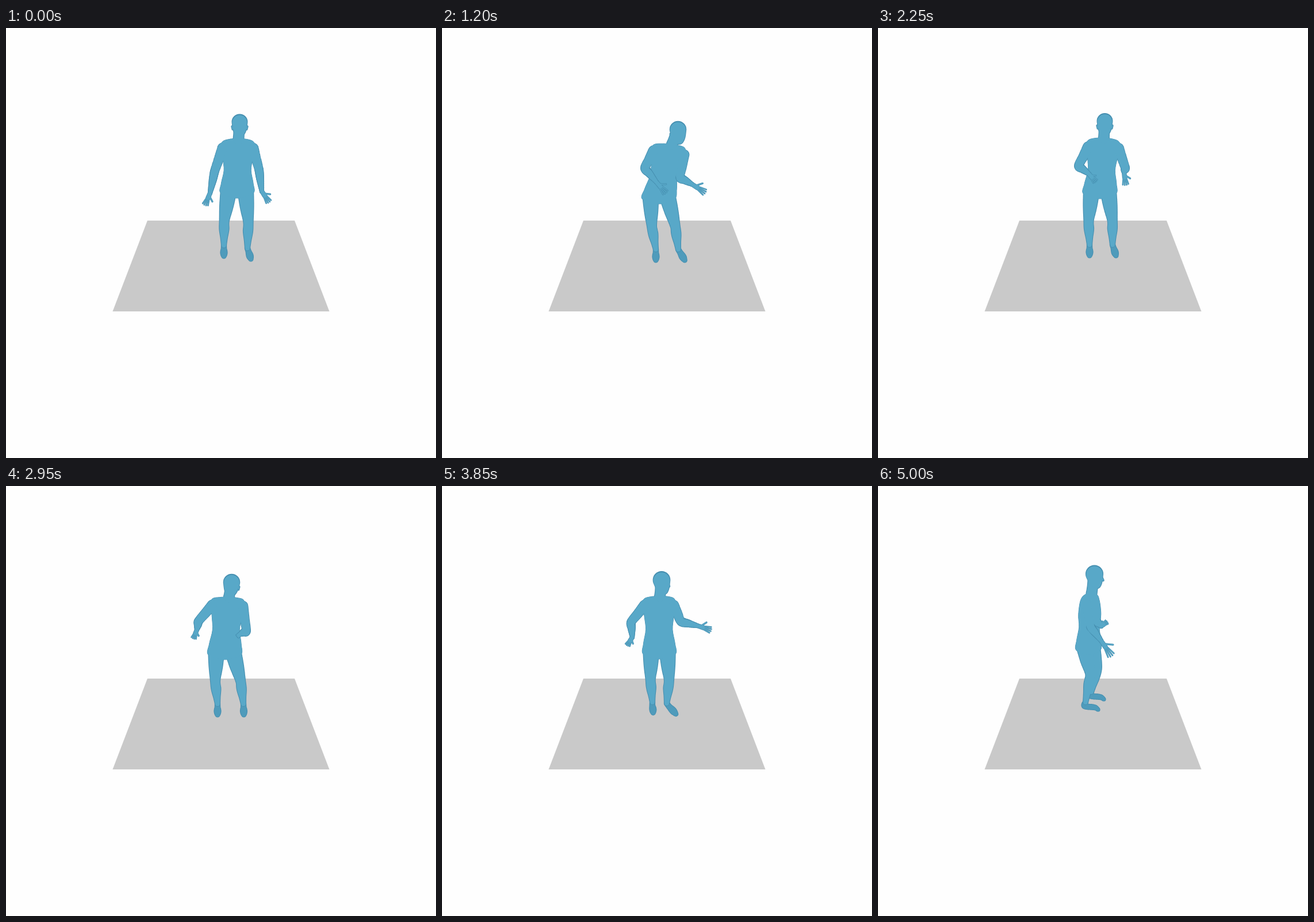
Animation, 748 px wide and 748 px high, one loop 5.05 s. Source, as an HTML page with a canvas:

```html
<!DOCTYPE html>
<html lang="en">
<head>
<meta charset="utf-8">
<title>Gesturing figure</title>
<style>
  html, body { margin: 0; width: 100%; height: 100%; overflow: hidden; background: #fefefe; }
  canvas { display: block; width: 748px; height: 748px; }
</style>
</head>
<body>
<canvas id="stage" width="748" height="748"></canvas>
<script>
const ctx = document.getElementById('stage').getContext('2d');
const LOOP = 5050, STEP = 50;
const LIGHT = '#58a8c8', RIM = '#468fb0', FOOT = '#4f9bbb';

// Key poses: only the joints that move freely; arms are elbow, wrist, fingertip.
const stand = {
  head: [406.5, 163.5], chest: [403.5, 208], pelvis: [402, 283], yaw: [0],
  armL: [363, 249, 355, 287, 346, 309], armR: [440, 246, 445, 284, 458, 304],
  footL: [379, 378], footR: [420, 383]
};
const lean = {
  head: [399.5, 175], chest: [393.5, 216], pelvis: [385.5, 295], yaw: [0.4],
  armL: [347, 249, 364, 269, 376, 288], armR: [431, 250, 444, 281, 467, 287],
  footL: [374, 391], footR: [414, 391]
};
const offer = {
  head: [410.5, 176.5], chest: [394.5, 216], pelvis: [377.5, 293], yaw: [0.5],
  armL: [353, 244, 373, 268, 390, 288], armR: [414, 260, 435, 272, 459, 287],
  footL: [372, 385], footR: [411, 385]
};
const upright = {
  head: [394.5, 162], chest: [392, 207], pelvis: [386, 284], yaw: [0],
  armL: [349, 240, 367, 254, 379, 268], armR: [430, 243, 428, 251, 431, 274],
  footL: [368, 377], footR: [408, 377]
};
const sway = {
  head: [392.5, 167.5], chest: [385.5, 207], pelvis: [380.5, 289], yaw: [-0.5],
  armL: [335, 235, 332, 250, 326, 266], armR: [418, 252, 407, 258, 402, 262],
  footL: [368, 379], footR: [413, 379]
};
const point = {
  head: [382, 163.5], chest: [377.5, 206.5], pelvis: [378, 288], yaw: [1.05],
  armL: [329, 237, 331, 263, 322, 278], armR: [416, 236, 444, 243, 469, 251],
  footL: [366, 376], footR: [391, 378]
};
const profile = {
  head: [376.5, 153], chest: [369, 205], pelvis: [366, 281], yaw: [1.57],
  armL: [370, 245, 388, 269, 407, 297], armR: [380, 235, 388, 244, 399, 236],
  footL: [361, 376], footR: [371, 358]
};

const lerp = (a, b, k) => a.map((v, i) => v + (b[i] - v) * k);
const shift = ([x, y], dx, dy) => [x + dx, y + dy];

function blend(a, b, k, changes) {
  const out = {};
  for (const part in a) out[part] = lerp(a[part], b[part], k);
  return { ...out, ...changes };
}

const keys = [
  [0, stand],
  [550, blend(stand, lean, 0.9, {
    armR: [435, 252, 448, 283, 470, 286], footL: [375, 396], footR: [416, 397] })],
  [800, lean],
  [1200, offer],
  [1650, blend(offer, upright, 0.9)],
  [2250, upright],
  [2950, sway],
  [3400, blend(sway, point, 0.45, { armL: [323, 224, 293, 238, 270, 246] })],
  [3850, point],
  [4400, blend(point, profile, 0.5, {
    armL: [353, 244, 365, 268, 376, 288], armR: [406, 234, 435, 241, 459, 247] })],
  [5000, profile]
];

// Hermite curve through the key poses
function poseAt(time) {
  let i = 0;
  while (i < keys.length - 2 && time >= keys[i + 1][0]) i++;
  const [t0, a] = keys[i], [t1, b] = keys[i + 1];
  const before = keys[i - 1], after = keys[i + 2];
  const span = t1 - t0, u = (time - t0) / span, u2 = u * u, u3 = u2 * u;
  const out = {};
  for (const part in a) {
    out[part] = a[part].map((p, n) => {
      const q = b[part][n];
      const m0 = before ? (q - before[1][part][n]) / (t1 - before[0]) * span : 0;
      const m1 = after ? (after[1][part][n] - p) / (after[0] - t0) * span : 0;
      return (2 * u3 - 3 * u2 + 1) * p + (u3 - 2 * u2 + u) * m0
           + (3 * u2 - 2 * u3) * q + (u3 - u2) * m1;
    });
  }
  return out;
}

// Derives every drawn part from the joints. `side` is 1 only in full profile.
function buildBody({ head, chest, pelvis, yaw: [yaw], ...p }) {
  const turn = Math.sin(yaw), side = Math.max(0, turn) ** 20;
  const tilt = (chest[0] - pelvis[0]) * 0.2;
  const axis = k => lerp(chest, pelvis, k);

  const flank = s => {
    const at = (k, half) => shift(axis(k), s * half * (1 - 0.25 * side), 0);
    return [
      shift(lerp(chest, head, 0.33), s * (14 - 6 * side), s * tilt / 2),
      shift(chest, s * (29 - 13 * side), s * tilt - 7),
      at(0.24, 26), at(0.53, 23.5), at(0.83, 27.8), at(1.06, 28)
    ];
  };
  const torso = [...flank(-1), shift(pelvis, 0, 13), ...flank(1).reverse()];

  const arm = (flat, s) => {
    const elbow = flat.slice(0, 2), wrist = flat.slice(2, 4), tip = flat.slice(4);
    const shoulder = shift(chest, s * (26.5 - 19.5 * side), s * tilt + 1);
    return {
      wrist, tip,
      nodes: [[...shoulder, 9.2], [...lerp(shoulder, elbow, 0.5), 8.4], [...elbow, 7.6],
              [...lerp(elbow, wrist, 0.4), 6.7], [...wrist, 3.8]]
    };
  };

  const leg = (ankle, s) => {
    const hip = shift(pelvis, s * (14.7 - 8.2 * side), 0);
    const knee = shift(lerp(hip, ankle, 0.55), s * 3 * (1 - side) + 9 * side, -6 * side);
    const reach = s < 0 ? 22 * side : 6 + 11 * turn + 5 * side;
    const toe = shift(ankle, reach, 19 - 6 * side);
    return {
      nodes: [[...hip, 14.2], [...lerp(hip, knee, 0.48), 12.3], [...knee, 8.9],
              [...lerp(knee, ankle, 0.35), 8.8], [...lerp(knee, ankle, 0.7), 6.4], [...ankle, 4.8]],
      foot: [[...ankle, 4.8], [...shift(lerp(ankle, toe, 0.3), -8 * side, 3 * side), 5],
             [...lerp(ankle, toe, 0.7), 6.2 - 1.5 * side], [...toe, 4.2 - side]]
    };
  };

  return {
    head, torso, turn, front: Math.cos(yaw), neck: lerp(chest, head, 0.33),
    arms: [arm(p.armR, 1), arm(p.armL, -1)],
    legs: [leg(p.footR, 1), leg(p.footL, -1)]
  };
}

const spline = (a, b, c, d, u) =>
  b + u / 2 * (c - a + u * (2 * a - 5 * b + 4 * c - d + u * (3 * (b - c) + d - a)));

// A rounded limb through nodes [x, y, radius]
function limb(nodes, color, grow = 0) {
  ctx.fillStyle = color;
  ctx.beginPath();
  for (let i = 0; i < nodes.length - 1; i++) {
    const b = nodes[i], c = nodes[i + 1], a = nodes[i - 1] || b, d = nodes[i + 2] || c;
    for (let s = 0; s <= 18; s++) {
      const [x, y, r] = b.map((v, n) => spline(a[n], v, c[n], d[n], s / 18));
      const radius = Math.max(0.5, r + grow);
      ctx.moveTo(x + radius, y);
      ctx.arc(x, y, radius, 0, 7);
    }
  }
  ctx.fill();
}

function line(a, b, width, color) {
  ctx.strokeStyle = color;
  ctx.lineWidth = width;
  ctx.lineCap = 'round';
  ctx.beginPath();
  ctx.moveTo(...a);
  ctx.lineTo(...b);
  ctx.stroke();
}

function blob(p, color, grow) {
  const n = p.length;
  ctx.beginPath();
  ctx.moveTo(...p[0]);
  p.forEach((b, i) => {
    const a = p[(i + n - 1) % n], c = p[(i + 1) % n], d = p[(i + 2) % n];
    ctx.bezierCurveTo(b[0] + (c[0] - a[0]) / 6, b[1] + (c[1] - a[1]) / 6,
      c[0] - (d[0] - b[0]) / 6, c[1] - (d[1] - b[1]) / 6, ...c);
  });
  ctx.fillStyle = ctx.strokeStyle = color;
  ctx.fill();
  if (grow > 0) {
    ctx.lineWidth = 1;
    ctx.stroke();
  }
}

function drawHead({ head, neck, turn, front }, color, grow) {
  const profile = Math.abs(turn);
  const top = shift(head, 0, grow < 0 ? 1 : 0);
  for (const s of [-1, 1]) {
    const ear = shift(head, s * 13 * front - 3 * turn, 8);
    limb([[...ear, 1.9], [...shift(ear, -s * 0.8, 5), 1.5]], color, grow);
  }
  limb([[...head, 11], [...lerp(head, neck, 0.6), 9.6], [...neck, 9.8]], color, grow);
  limb([[...top, 13.7 + 1.6 * profile], [...shift(head, 2 * turn, 11), 12],
        [...shift(head, 4 * turn, 18), 8.8 - profile]], color, grow);
  if (profile > 0.7) {
    const nose = shift(head, 15 * turn, 11);
    limb([[...shift(nose, -3 * turn, -5), 2.4], [...nose, 2]], color, grow);
  }
}

function drawHand({ wrist, tip }, color, grow) {
  const angle = Math.atan2(tip[1] - wrist[1], tip[0] - wrist[0]);
  const length = Math.hypot(tip[0] - wrist[0], tip[1] - wrist[1]);
  const polar = (from, a, r) => shift(from, Math.cos(a) * r, Math.sin(a) * r);
  const palm = polar(wrist, angle, length * 0.38);
  limb([[...wrist, 3.7], [...palm, 4]], color, grow);
  for (let i = -1.5; i <= 1.5; i++) {
    const base = polar(palm, angle + Math.PI / 2, i * 1.5);
    line(base, polar(base, angle + i * 0.14, length * (0.6 - Math.abs(i) * 0.04)),
      2.2 + grow * 1.4, color);
  }
  line(lerp(wrist, palm, 0.5), polar(wrist, angle - 0.65, length * 0.65), 2.7 + grow * 1.4, color);
}

function drawBody(body, color, grow) {
  for (const leg of body.legs) limb(leg.nodes, color, grow);
  blob(body.torso, color, grow);
  for (const arm of body.arms) limb(arm.nodes, color, grow);
  drawHead(body, color, grow);
}

function draw(time) {
  ctx.fillStyle = '#fefefe';
  ctx.fillRect(0, 0, 748, 748);
  ctx.fillStyle = '#c9c9c9';
  ctx.beginPath();
  ctx.moveTo(246, 335);
  ctx.lineTo(502, 335);
  ctx.lineTo(562.5, 493);
  ctx.lineTo(185.5, 493);
  ctx.fill();

  const body = buildBody(poseAt(time));
  for (const leg of body.legs) {
    limb(leg.foot, RIM, 0.4);
    limb(leg.foot, FOOT, -0.7);
  }
  drawBody(body, RIM, 0.3);
  drawBody(body, LIGHT, -0.8);
  for (const arm of body.arms) {
    limb(arm.nodes.slice(2), RIM, 0.3);
    drawHand(arm, RIM, 0.4);
    limb(arm.nodes, LIGHT, -0.8);
    drawHand(arm, LIGHT, -0.6);
  }
}

function frame(now) {
  draw(Math.floor(now % LOOP / STEP) * STEP);
  requestAnimationFrame(frame);
}
draw(0);
requestAnimationFrame(frame);
</script>
</body>
</html>
```
